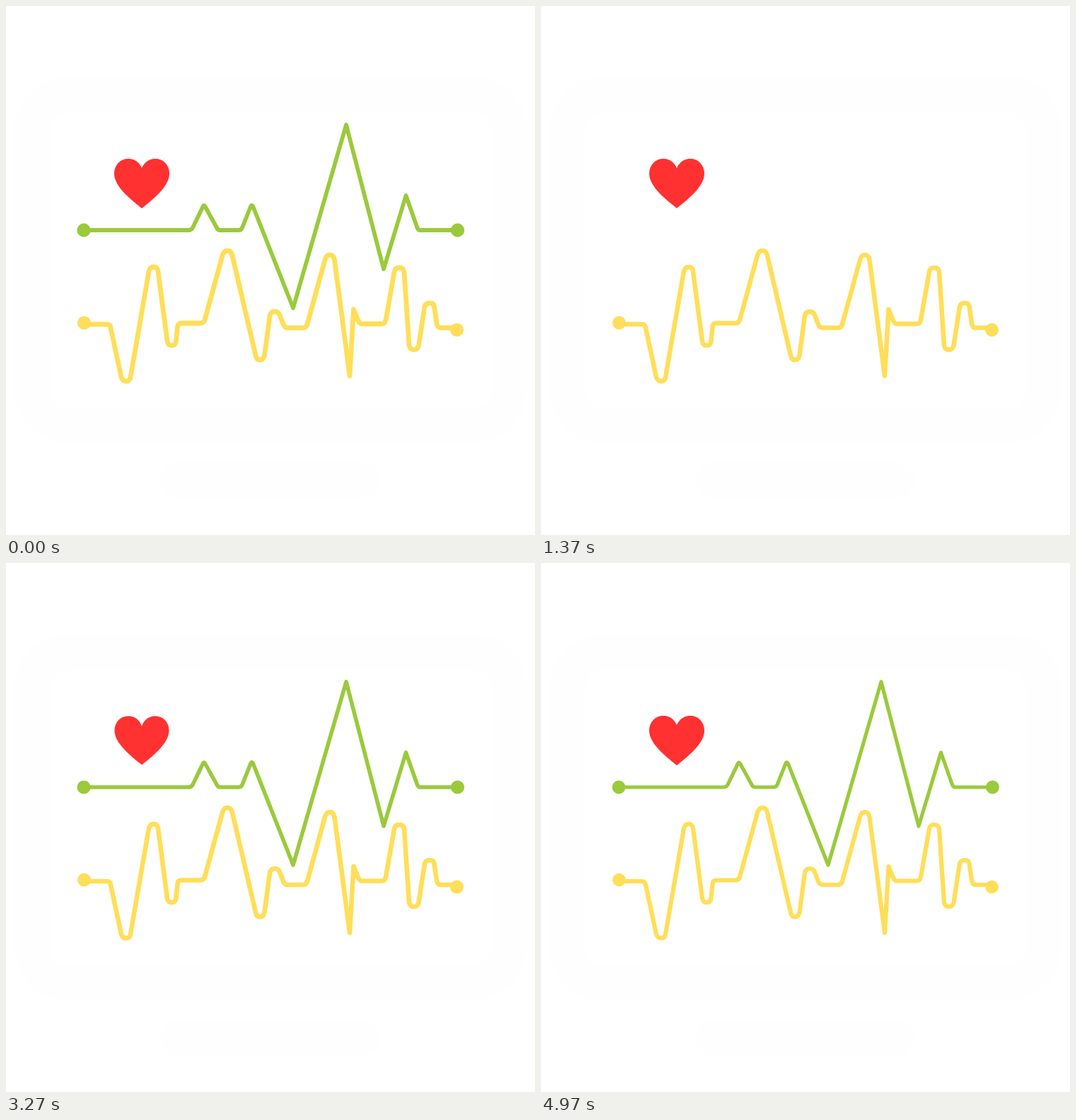
An HTML page that plays this animation: 748 by 748 pixels, repeating every 5010 ms.

```html
<!DOCTYPE html>
<html lang="en">
<head>
<meta charset="utf-8">
<title>Heart monitor</title>
<style>
  html, body { margin: 0; width: 100%; height: 100%; overflow: hidden; background: #fff; }
  svg { display: block; width: 100%; height: 100%; }
  .trace { fill: none; stroke-linecap: round; stroke-linejoin: round; }
  #green { stroke: #9aca3c; }
  #yellow { stroke: #ffde59; }
  #heart { fill: #ff3131; stroke: #ff3131; }
</style>
</head>
<body>
<svg viewBox="0 0 748 748">
  <g fill="#fefefe">
    <rect x="12" y="100" width="724" height="518" rx="75"/>
    <rect x="62" y="152" width="624" height="416" rx="25" fill="#fff"/>
    <rect x="218" y="645" width="310" height="51" rx="25"/>
  </g>

  <g id="yellow" class="trace">
    <path d="M110 450H143Q147 450 148 455L163 525Q165 530.5 170 530.5Q175 530.5 176 525
      L202 375Q204 369 208.5 369Q214 369 215 375L228 474Q229 480 234 480Q240 480 240.5 474
      L242.5 454Q243 448.5 248 448.5H275Q279.5 448.5 281 444L306 353Q308 346 313 346
      Q318.5 346 320 353L353 494Q354 500.5 359 500.5Q364 500.5 365.5 494L373 438
      Q374.5 432 380 432Q385 432 387 437L392 450Q394 455 398 455H420Q424.5 455 426 450
      L451 359Q453 352 458 352Q463 352 464.5 359L486 523L491.5 429L498 445
      Q500 449.5 503 449.5H531Q536 449.5 537 444L549 376Q550 370 556 370Q562 370 563 376
      L570 480Q571 486 577 486Q582 486 583.5 480L592 425Q593.5 420 599 420
      Q605 420 605.5 425L609 449Q610 455 614 455H637"/>
    <circle cx="110.5" cy="448" r="6.2" fill="#ffde59"/>
    <circle cx="637.5" cy="458" r="6.2" fill="#ffde59"/>
  </g>

  <g id="green" class="trace">
    <path d="M110 317H258Q262 317 264 313.5L278.5 283.5Q280 280.5 281.5 283.5L298 313.5
      Q299.5 317 303 317H329Q332.5 317 334 313.5L346 283.5Q347.5 280 349.5 284
      L406 427L481 168L534 372L565.5 268L581.5 313.5Q583 317 585.5 317H638"/>
    <circle cx="110" cy="317" r="6.8" fill="#9aca3c"/>
    <circle cx="638.5" cy="317" r="6.8" fill="#9aca3c"/>
  </g>

  <path id="heart" d="M192 285.3C176 272.5 153.6 255 153.6 237C153.6 225 162 216.6 173 216.6
    C182 216.6 189 222 192 231C195 222 202 216.6 211 216.6C222 216.6 230.4 225 230.4 237
    C230.4 255 208 272.5 192 285.3Z"/>
</svg>
<script>
  const LOOP = 5010, STEP = 1000 / 30;

  // Each part pulses at its own pace: edges thin out, then it cuts off
  // while the phase is within `off` of the pulse's midpoint.
  const parts = [
    { id: 'green',  period: 1045, off: 0.21, width: 5.8, thin: 1.2 },
    { id: 'yellow', period: 1150, off: 0.14, width: 6.8, thin: 0.8 },
    { id: 'heart',  period: 1240, off: 0.10, width: 1.2, thin: 1.2 }
  ].map(p => ({ ...p, el: document.getElementById(p.id) }));

  function draw(t) {
    for (const { el, period, off, width, thin } of parts) {
      const phase = t / period % 1;
      const fade = (1 - Math.cos(2 * Math.PI * phase)) / 2;
      el.style.visibility = Math.abs(phase - 0.5) < off ? 'hidden' : 'visible';
      el.style.strokeWidth = width - thin * fade;
    }
  }

  let start;
  function tick(now) {
    start ??= now;
    draw(Math.floor((now - start) % LOOP / STEP) * STEP);
    requestAnimationFrame(tick);
  }
  draw(0);
  requestAnimationFrame(tick);
</script>
</body>
</html>
```
